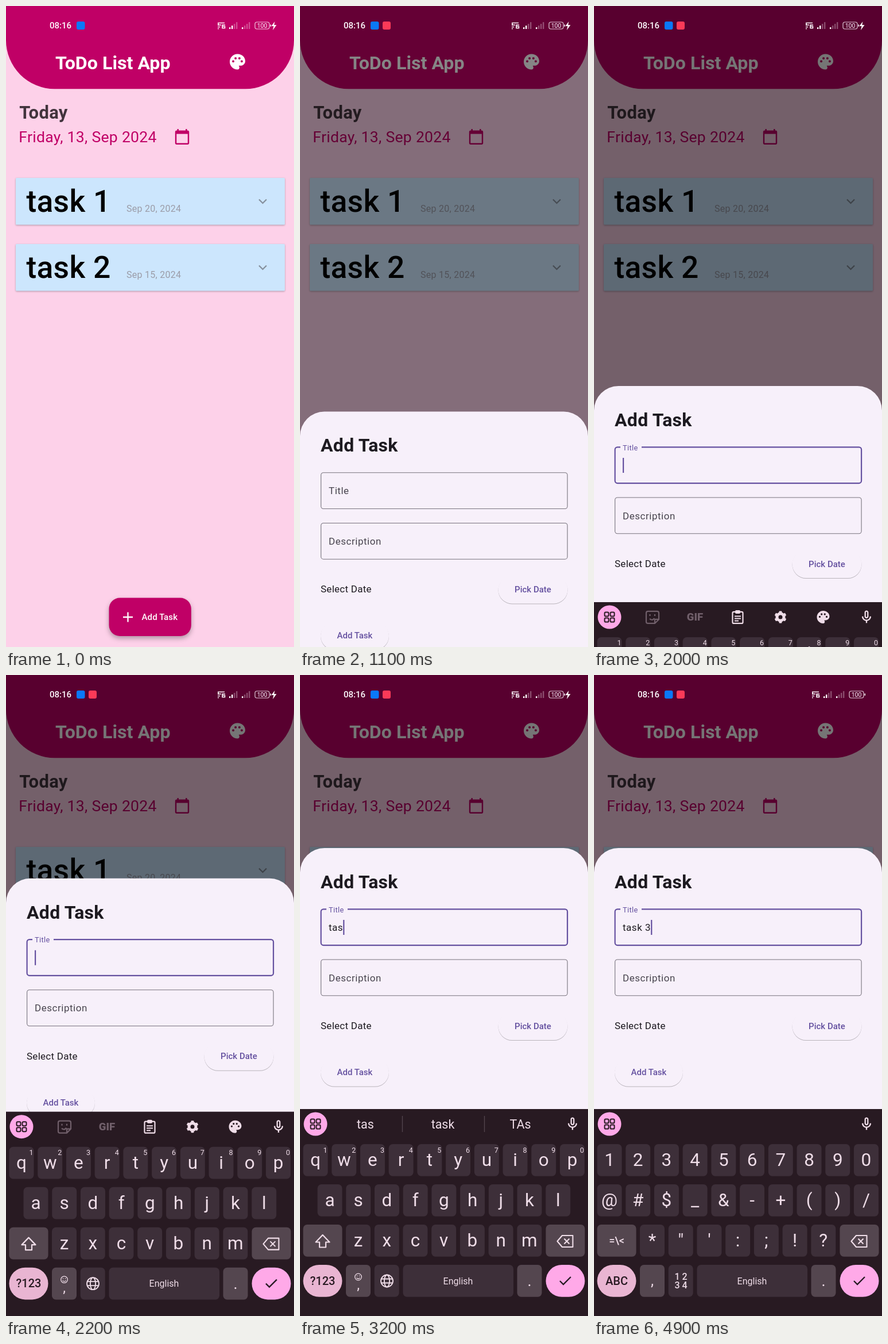
Animation of 502 by 1115 pixels, one loop 5000 ms. Source, as an HTML page:

```html
<!DOCTYPE html>
<html lang="en">
<head>
<meta charset="utf-8">
<title>Task list</title>
<style>
html, body { margin: 0; width: 100%; height: 100%; overflow: hidden; background: #fdd1e9; }
svg { display: block; width: 100vw; height: 100vh; font-family: Roboto, "Noto Sans", sans-serif; }
text { white-space: pre; }
.card { filter: drop-shadow(0 1.5px 1.5px rgba(0,0,0,.3)); }
.fab { filter: drop-shadow(0 4px 4px rgba(0,0,0,.3)); }
.pill { fill: #f7f0fa; filter: drop-shadow(0 1.3px .7px rgba(0,0,0,.25)); }
</style>
</head>
<body>
<svg id="stage" viewBox="0 0 502 1115"></svg>
<script>
const LOOP = 5000, STEP = 100;
const PINK = '#c00066', SHEET = '#f7f0fa', PURPLE = '#6551a0', INK = '#efdde8';
const KEY = '#3d2f39', KEY2 = '#54464f', DARK = '#281a22', ACCENT = '#ffa9e8', SOFT = '#e9b5d2';
const SHEET_H = 454, KEYS_H = 360;

const text = (x, y, size, fill, str, extra = '') =>
  `<text x="${x}" y="${y}" font-size="${size}" fill="${fill}" ${extra}>${str}</text>`;
const mid = (x, y, size, fill, str, weight = 400) =>
  text(x, y, size, fill, str, `text-anchor="middle" font-weight="${weight}"`);
const rect = (x, y, w, h, r, fill, extra = '') =>
  `<rect x="${x}" y="${y}" width="${w}" height="${h}" rx="${r}" fill="${fill}" ${extra}/>`;
const line = (d, color, width, extra = '') =>
  `<path d="${d}" fill="none" stroke="${color}" stroke-width="${width}" ${extra}/>`;
const group = (id, body, extra = '') => `<g id="${id}" ${extra}>${body}</g>`;
// Icons live on a 24 unit grid and are placed by their centre.
const icon = (x, y, scale, fill, d) =>
  `<path transform="translate(${x} ${y}) scale(${scale}) translate(-12 -12)" fill="${fill}" fill-rule="evenodd" d="${d}"/>`;

const dot = (x, y) => `M${x - 1.5} ${y}a1.5 1.5 0 1 0 3 0a1.5 1.5 0 1 0-3 0z`;
const PALETTE = 'M12 2C6.5 2 2 6.5 2 12s4.5 10 10 10c1.4 0 2.5-1.1 2.5-2.5 0-.6-.2-1.2-.6-1.7-.4-.4 0-.8.3-.8H16c3.3 0 6-2.7 6-6 0-5-4.5-9-10-9z'
  + dot(6.5, 11.5) + dot(9.5, 7.5) + dot(14.5, 7.5) + dot(17.5, 11.5);
const CALENDAR = 'M20 3h-1V1h-2v2H7V1H5v2H4c-1.1 0-2 .9-2 2v16c0 1.1.9 2 2 2h16c1.1 0 2-.9 2-2V5c0-1.1-.9-2-2-2zm0 18H4V8h16z';
const MIC = 'M12 14c1.7 0 3-1.3 3-3V5c0-1.7-1.3-3-3-3S9 3.3 9 5v6c0 1.7 1.3 3 3 3zM11 5a1 1 0 0 1 2 0v6a1 1 0 0 1-2 0zM17 11a5 5 0 0 1-10 0H5c0 3.5 2.6 6.4 6 6.9V21h2v-3.1c3.4-.5 6-3.4 6-6.9z';

function statusBar() {
  const bars = (x, lit) => [3, 6, 9, 12].map((h, i) =>
    rect(x + i * 4, 40 - h, 2.4, h, .5, '#fff', `opacity="${i < lit ? 1 : .3}"`)).join('');
  const right = line('M369 29.5h12M369 33h6M369 36.5h4M369 39.5h2M370 29v5', '#fff', 1.6)
    + line('M382 33h-5v5.5h4.5v-3h-4', '#fff', 1.5)
    + bars(389, 2) + bars(411, 1)
    + rect(434, 28, 25, 12, 3.5, 'none', 'stroke="#fff" stroke-opacity=".8" stroke-width="1.2"')
    + rect(460.5, 32, 1.5, 4, .7, '#fff') + mid(446.5, 38, 10.5, '#fff', '100');
  return text(76, 39, 15, '#fff', '08:16', 'font-weight="500"')
    + rect(123, 27, 14.5, 14, 3, '#0a78f8') + rect(144, 27, 14, 14, 3, '#fb3a58', 'id="rec"')
    + group('signals', right)
    + '<path id="bolt" fill="#fff" d="M468.5 27l-6 8h4l-1.5 7 6.5-9h-4.2z"/>';
}

function page() {
  const card = (y, name, date) => rect(17, y, 469, 81.5, 1.5, '#cce6fd', 'class="card"')
    + text(35.5, y + 59.3, 53.25, '#000', name, 'font-weight="500" letter-spacing=".27"')
    + text(210, y + 58.5, 16, '#9b9ca8', date, 'letter-spacing=".27"')
    + line(`M441 ${y + 37.5}l6.5 6.5 6.5-6.5`, '#858f9c', 2.2);
  return rect(0, 0, 502, 1115, 0, '#fdd1e9')
    + `<path fill="${PINK}" d="M0 0H502V59.300A85 85 0 0 1 417 144.300H85A85 85 0 0 1 0 59.300z"/>`
    + text(86, 110, 32.2, '#fff', 'ToDo List App', 'font-weight="600"')
    + icon(403.5, 97, 1.35, '#fff', PALETTE)
    + text(23.3, 196, 31, '#42343d', 'Today', 'font-weight="700" letter-spacing=".27"')
    + text(22.3, 237, 26.6, PINK, 'Friday, 13, Sep 2024', 'letter-spacing=".27"')
    + icon(307, 227.5, 1.22, PINK, CALENDAR)
    + card(299, 'task 1', 'Sep 20, 2024') + card(414, 'task 2', 'Sep 15, 2024')
    + rect(179.5, 1029.5, 143.3, 66.5, 19, PINK, 'class="fab"')
    + rect(179.5, 1029.5, 143.3, 66.5, 19, '#fff', 'id="fabInk" opacity="0"')
    + line('M204 1063h17M212.5 1054.5v17', '#fff', 2.3)
    + text(236.5, 1068, 15, '#fff', 'Add Task', 'font-weight="500" letter-spacing=".1"');
}

function sheet() {
  const r = 42.6;
  const pill = (x, y, w, label) => rect(x, y, w, 48.5, 24.2, SHEET, 'class="pill"')
    + mid(x + w / 2, y + 29, 15, PURPLE, label, 500);
  const field = (y, id) => rect(36.6, y, 429.5, 62.8, 4.3, 'none', `id="${id}" stroke="#79747e" stroke-width="1.1"`);
  return `<path fill="${SHEET}" d="M0 ${r}A${r} ${r} 0 0 1 ${r} 0H${502 - r}A${r} ${r} 0 0 1 502 ${r}V${SHEET_H}H0z"/>`
    + text(36, 70, 32, '#1d1a20', 'Add Task', 'font-weight="700" letter-spacing=".27"')
    + field(106.3, 'titleBox') + field(194, 'descBox')
    + rect(46, 102, 37, 8, 0, SHEET, 'id="notch"')
    + group('label', text(0, 0, 17, 'inherit', 'Title', 'letter-spacing=".53"'))
    + text(50, 231.5, 17, '#49454f', 'Description', 'letter-spacing=".53"')
    + text(50, 143.5, 17, '#1d1a20', '', 'id="typed" letter-spacing=".53"')
    + rect(50, 125, 2.2, 26, 0, PURPLE, 'id="cursor"')
    + text(36, 315, 17, '#1d1a20', 'Select Date', 'letter-spacing=".27"')
    + pill(345.5, 285.5, 121, 'Pick Date') + pill(36, 366, 119, 'Add Task');
}

const ROW_Y = [61, 131, 201, 271], PITCH = 49.72;
const keyX = (i, start = 5.5) => start + i * PITCH;
const key = (x, y, w, fill = KEY, r = 7) => rect(x, y, w, 55.8, r, fill);

function keyRow(chars, row, start, hints = '') {
  return [...chars].map((c, i) => {
    const x = keyX(i, start), y = ROW_Y[row];
    const glyph = { '<': '&lt;', '&': '&amp;' }[c] || c;
    return key(x, y, 43) + mid(x + 21.5, y + 38, 31.5, INK, glyph)
      + (hints ? mid(x + 38.5, y + 14.5, 12.5, INK, hints[i]) : '');
  }).join('');
}

function keyboard() {
  const [, , y3, y4] = ROW_Y;
  const smile = `<circle cx="101.5" cy="292" r="5.8" fill="none" stroke="${INK}" stroke-width="1.3"/>`
    + line('M98.5 293.5q3 3.5 6 0M99.5 289.5v1.5M103.5 289.5v1.5', INK, 1.3);
  const globe = `<g fill="none" stroke="${INK}" stroke-width="1.9"><circle cx="151.5" cy="299" r="10.5"/>`
    + '<ellipse cx="151.5" cy="299" rx="4.6" ry="10.5"/><path d="M142 295.5h19M142 302.5h19"/></g>';
  const letters = keyRow('qwertyuiop', 0, 5.5, '1234567890') + keyRow('asdfghjkl', 1, 30.5)
    + keyRow('zxcvbnm', 2, 80) + line('M39.5 219l12 12.5h-6.5v9h-11v-9h-6.5z', INK, 2.2, 'stroke-linejoin="round"')
    + smile + mid(101.5, 314, 24, INK, ',') + globe + mid(39.5, 305.5, 20, DARK, '?123', 500);
  const symbols = keyRow('1234567890', 0, 5.5) + keyRow('@#$_&-+()/', 1, 5.5)
    + keyRow('*"\':;!?', 2, 80) + mid(39.5, 235, 18, INK, '=\\&lt;', 500)
    + mid(101.5, 307, 26, INK, ',') + mid(151.5, 297, 16, INK, '1 2', 500) + mid(151.5, 312, 16, INK, '3 4', 500)
    + mid(39.5, 305.5, 20, DARK, 'ABC', 500);
  const keyBase = key(5.5, y3, 68, KEY2) + key(428.5, y3, 68, KEY2) + key(5.5, y4, 68, SOFT, 27.9)
    + key(80, y4, 43, KEY2) + key(129.7, y4, 43) + key(179.5, y4, 192.5) + key(378.5, y4, 43, KEY2)
    + key(428.5, y4, 68, ACCENT, 27.9)
    + line('M457 220h18.5v20H457l-8.5-10z', INK, 2.1, 'stroke-linejoin="round"') + line('M460.5 225.5l9 9M469.5 225.5l-9 9', INK, 2.1)
    + mid(275.5, 304.5, 16, INK, 'English') + mid(400, 308, 27, INK, '.')
    + line('M453 299l6 6 13-13', DARK, 2.3);
  const grid = [[18.5, 17.5], [28.5, 17.5], [18.5, 27.5], [28.5, 27.5]].map(([x, y]) =>
    rect(x, y, 7, 7, 1.8, 'none', `stroke="${DARK}" stroke-width="2"`)).join('');
  const dim = '#705f6a';
  const gear = `<circle cx="325" cy="26" r="6" fill="none" stroke="${INK}" stroke-width="5"/>`
    + [0, 60, 120, 180, 240, 300].map(a =>
      rect(322.5, 15.5, 5, 5, 1, INK, `transform="rotate(${a} 325 26)"`)).join('');
  const tools = line('M94 16h16a3 3 0 0 1 3 3v11l-7 7H94a3 3 0 0 1-3-3V19a3 3 0 0 1 3-3zM106 36v-6h6M97 29q5 4 8-1M97.5 21v3M106 21v3', dim, 2.2)
    + mid(176, 32.5, 18.5, dim, 'GIF', 800)
    + rect(241.5, 17, 18, 20, 2, 'none', `stroke="${INK}" stroke-width="2.2"`) + rect(246, 14, 9, 6, 2, INK)
    + line('M245 24.5h11M245 28.5h11M245 32.5h7', INK, 2)
    + gear + icon(399.5, 26, 1.1, INK, PALETTE);
  const words = [114, 249, 384].map(x => mid(x, 33.5, 21.5, INK, '')).join('')
    + line('M178.5 12v28M321.5 12v28', KEY2, 1.3);
  return rect(0, 0, 502, KEYS_H + 10, 0, DARK)
    + `<circle cx="27" cy="26" r="20.5" fill="${ACCENT}"/>` + grid
    + icon(475, 26, 1.15, INK, MIC)
    + group('tools', tools) + group('words', words)
    + keyBase + group('letters', letters) + group('symbols', symbols)
    + rect(0, 0, 43, 55.8, 7, '#fff', 'id="press" opacity=".16"');
}

const stage = document.getElementById('stage');
stage.innerHTML = page() + rect(0, 0, 502, 1115, 0, '#000', 'id="barrier"')
  + group('sheet', sheet()) + group('keyboard', keyboard()) + statusBar();
const $ = id => document.getElementById(id);
const wordSlots = $('words').querySelectorAll('text');

const set = (id, attrs) => { for (const k in attrs) $(id).setAttribute(k, attrs[k]); };
const show = (id, on) => set(id, { visibility: on ? 'visible' : 'hidden' });
const move = (id, y) => set(id, { transform: `translate(0 ${y})` });
const span = (t, start, length) => Math.min(1, Math.max(0, (t - start) / length));

function bezier(x1, y1, x2, y2) {
  const at = (s, a, b) => 3 * (1 - s) * (1 - s) * s * a + 3 * (1 - s) * s * s * b + s * s * s;
  return x => {
    let lo = 0, hi = 1;
    for (let i = 0; i < 30; i++) {
      const s = (lo + hi) / 2;
      if (at(s, x1, x2) < x) lo = s; else hi = s;
    }
    return x <= 0 ? 0 : x >= 1 ? 1 : at(lo, y1, y2);
  };
}
const ease = bezier(.25, .1, .25, 1), decelerate = bezier(0, 0, .2, 1);
const fastOut = bezier(.4, 0, .2, 1), emphasized = bezier(.2, 0, 0, 1);

// [time, typed text, suggestions]
const TYPING = [
  [0, '', null],
  [2700, 't', ['t', 'the', 'to']],
  [2900, 'ta', ['ta', 'take', 'TA']],
  [3100, 'tas', ['tas', 'task', 'TAs']],
  [3400, 'task', ['tasks', 'task', 'Task']],
  [3700, 'task ', ['3', 'force', '2']],
  [4700, 'task 3', ['', '', '']]
];
// [time, x, row, width]
const PRESSES = [
  [2700, keyX(4), 0, 43], [2900, keyX(0, 30.5), 1, 43], [3100, keyX(1, 30.5), 1, 43],
  [3400, keyX(7, 30.5), 1, 43], [3700, 179.5, 3, 192.5], [3900, 5.5, 3, 68], [4700, keyX(2), 0, 43]
];

function draw(t) {
  const open = span(t, 950, 250), focused = t >= 1850;
  const keysUp = emphasized(span(t, 1967, 286));
  // The sheet follows the keyboard one tenth of a second later.
  const lift = emphasized(span(t, 2067.5, 286));
  const float = fastOut(span(t, 1830, 167));

  show('rec', t >= 200);
  const unplugged = t >= 3700;
  show('bolt', !unplugged);
  set('signals', { transform: `translate(${unplugged ? 11 : 0} 0)` });

  set('fabInk', { opacity: .12 * span(t, 500, 200) * (1 - span(t, 800, 250)) });
  set('barrier', { opacity: .54 * ease(open) });
  move('sheet', 1115 - SHEET_H * decelerate(open) - KEYS_H * lift);
  move('keyboard', 1115 - KEYS_H * keysUp);
  show('keyboard', keysUp > 0);

  const labelColor = focused ? PURPLE : '#49454f';
  set('titleBox', { stroke: focused ? PURPLE : '#79747e', 'stroke-width': focused ? 2.2 : 1.1 });
  set('label', { transform: `translate(50 ${144 - 32.5 * float}) scale(${1 - .25 * float})` });
  $('label').firstChild.setAttribute('fill', labelColor);
  set('notch', { width: 37 * float });

  const [, typed, words] = TYPING.filter(step => step[0] <= t).pop();
  $('typed').textContent = typed;
  set('cursor', { x: 50 + (typed ? $('typed').getComputedTextLength() : 0) });
  show('cursor', focused);

  const up = keysUp > 0, hasWords = !!words && words[0] !== '';
  show('tools', up && !words);
  show('words', up && hasWords);
  wordSlots.forEach((slot, i) => { slot.textContent = words ? words[i] : ''; });
  show('letters', up && t < 4000);
  show('symbols', up && t >= 4000);

  const press = PRESSES.find(p => t >= p[0] && t < p[0] + STEP);
  show('press', !!press);
  if (press) set('press', { x: press[1], y: ROW_Y[press[2]], width: press[3], rx: press[3] === 68 ? 27.9 : 7 });
}

const begin = performance.now();
function tick() {
  const t = (performance.now() - begin) % LOOP;
  draw(Math.floor(t / STEP) * STEP);
  requestAnimationFrame(tick);
}
tick();
</script>
</body>
</html>
```
